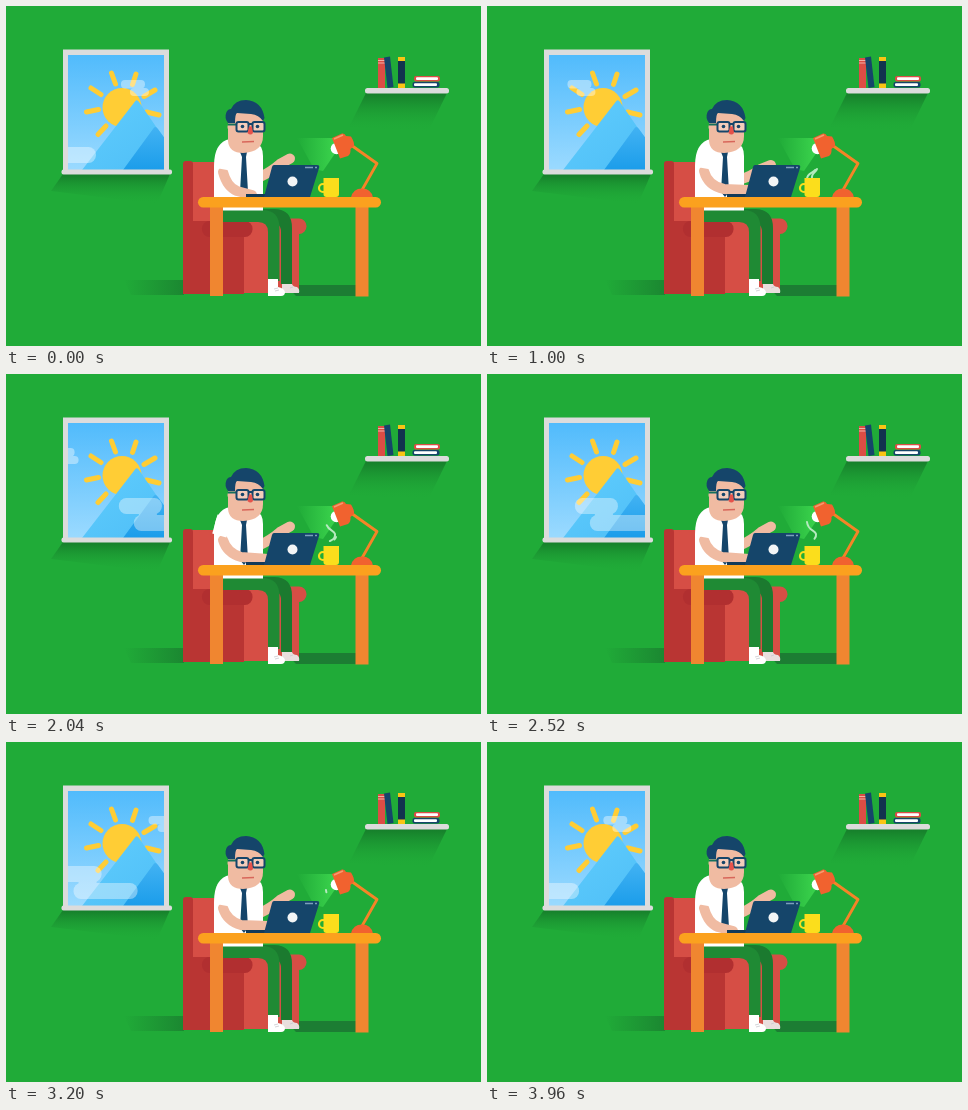
Recreate the animation shown at these times as an HTML page without scripts. Size 475 by 340 pixels, loop 4000 ms.

```html
<!DOCTYPE html>
<html lang="en">
<head>
<meta charset="utf-8">
<title>Desk work</title>
<style>
html, body { margin: 0; width: 100%; height: 100%; overflow: hidden; background: #20ab38; }
svg { display: block; width: 475px; height: 340px; }
.pale { fill: #dcdcdc; }
.navy { fill: #15456a; }
.skin { fill: #f0bba2; }
.limb { fill: none; stroke: #f0bba2; stroke-width: 10; stroke-linecap: round; stroke-linejoin: round; }
.deep { fill: #b93533; }
.red { fill: #d64e45; }
.rays { stroke: #ffcd35; stroke-width: 5; stroke-linecap: round; }
.steam { fill: none; stroke: #b5eabf; stroke-width: 2; stroke-linecap: round; }
</style>
</head>
<body>
<svg viewBox="0 0 475 340">
<defs>
  <linearGradient id="sky" x2="0" y2="1">
    <stop stop-color="#51bbfc"/><stop offset="1" stop-color="#9bdaff"/>
  </linearGradient>
  <linearGradient id="peak" x2="1" y2="1">
    <stop offset=".3" stop-color="#5ac8fb"/><stop offset="1" stop-color="#4dbdf6"/>
  </linearGradient>
  <linearGradient id="ridge" x2="0" y2="1">
    <stop stop-color="#42b2f3"/><stop offset="1" stop-color="#1b9dea"/>
  </linearGradient>
  <linearGradient id="drop" x2="0" y2="1">
    <stop stop-color="#147528" stop-opacity=".85"/><stop offset="1" stop-color="#20ab38" stop-opacity="0"/>
  </linearGradient>
  <linearGradient id="floor">
    <stop stop-color="#1b8731" stop-opacity="0"/><stop offset="1" stop-color="#1b8731"/>
  </linearGradient>
  <linearGradient id="glow">
    <stop stop-color="#3ed84f" stop-opacity="0"/><stop offset="1" stop-color="#3ed84f"/>
  </linearGradient>
  <clipPath id="pane"><rect x="62" y="49" width="96" height="115"/></clipPath>
  <g id="small">
    <rect x="115" y="74" width="24" height="8.5" rx="4"/>
    <rect x="124" y="82" width="19" height="8" rx="4"/>
  </g>
  <g id="large">
    <rect x="11" y="124" width="43" height="16" rx="7.5"/>
    <rect x="26" y="141" width="64" height="16" rx="7.5"/>
    <path d="M31 139H49V142H31Z"/>
  </g>
</defs>

<rect width="475" height="340" fill="#20ab38"/>

<!-- window -->
<path d="M57 168H164L151 198L45 185Z" fill="url(#drop)"/>
<rect class="pale" x="57" y="43.500" width="106" height="122"/>
<g clip-path="url(#pane)">
  <rect x="62" y="49" width="96" height="115" fill="url(#sky)"/>
  <circle cx="116" cy="101.500" r="19.500" fill="#ffcd35"/>
  <path class="rays" d="M105.500 67L109.500 78M130 68L126.500 78.500M149 84L138 90.500M153 109L140.500 106M85 82L95 88.500M80.500 106L92.500 103.500M92 128.500L100 120"/>
  <path d="M76 164L129 95.500Q131 93 133 96L180 164Z" fill="url(#peak)"/>
  <path d="M117 164L147 123Q149 119 152 123L182 164Z" fill="url(#ridge)"/>
  <g fill="#fff" opacity=".4">
    <use href="#small"/><use href="#small" x="138"/>
    <animateTransform attributeName="transform" type="translate" from="0" to="-138" dur="4s" repeatCount="indefinite"/>
  </g>
  <g fill="#fff" opacity=".38">
    <use href="#large"/><use href="#large" x="208"/>
    <animateTransform attributeName="transform" type="translate" from="0" to="-208" dur="4s" repeatCount="indefinite"/>
  </g>
</g>
<rect class="pale" x="55.500" y="163.500" width="110.500" height="5" rx="2"/>

<!-- shelf -->
<path d="M360 87H441L422 126L343 121Z" fill="url(#drop)"/>
<rect x="372" y="52" width="7" height="30" fill="#dc4d45"/>
<path d="M372 54.500H379M372 57H379" stroke="#f2b0a6"/>
<path class="navy" d="M378 51.500L384 50.500L387.500 81L381.500 82Z"/>
<rect x="392" y="51" width="7" height="31" fill="#12334f"/>
<path d="M392 51H399V55H392ZM392 77.500H399V82H392Z" fill="#f9c414"/>
<rect x="408" y="70" width="26" height="5.500" rx="2" fill="#dc4d45"/>
<rect x="410" y="71.300" width="22" height="2.800" rx="1" fill="#fff"/>
<rect class="navy" x="406.500" y="76" width="27" height="5.500" rx="2"/>
<rect x="408" y="77.300" width="23" height="2.800" rx="1" fill="#fff"/>
<rect class="pale" x="359" y="82" width="84" height="5.500" rx="2.500"/>

<!-- floor shadows -->
<path d="M118 274H178V289H125Z" fill="url(#floor)"/>
<path d="M280 279H350V290H290Z" fill="#1c7d33"/>

<!-- chair -->
<rect class="red" x="184" y="156" width="40" height="70" rx="3"/>
<rect class="red" x="238" y="213" width="55" height="74"/>
<rect class="red" x="276" y="212.500" width="24.500" height="15.500" rx="7.500"/>
<path class="deep" d="M177 158Q177 155 180 155H184Q187 155 187 158V215H238V288H177Z"/>
<rect x="196" y="215" width="50.500" height="16" rx="7.500" fill="#b12f30"/>

<!-- legs -->
<path d="M217 203H268Q286 203 286 222V278H275V226Q275 216 263 215H217Z" fill="#1b7a2f"/>
<path d="M217 204H256Q273.500 204 273.500 222V275H262V226Q262 216 252 216H217Z" fill="#1f8a34"/>
<path d="M276 278H286Q287 281 291 281Q294 283 293 287H276Z" fill="#e9dedd"/>
<path d="M262 273H272V281Q278 282 279 286Q279 290 275 290H262Z" fill="#fff"/>
<path d="M268 283l4-1M269 285l4-1M284 282l3-1" stroke="#c9c9cf" stroke-width=".8"/>

<!-- lamp light -->
<path d="M291 132H334L330 146L317 165L308 163Z" fill="url(#glow)"/>

<!-- body -->
<path class="limb" d="M252 172Q265 166 274 158L284 152.500">
  <animate attributeName="d" dur="4s" repeatCount="indefinite" keyTimes="0;.2;.24;.27;.31;1"
    values="M252 172Q265 166 274 158L284 152.500;M252 172Q265 166 274 158L284 152.500;M252 174Q265 170 274 163L284 159;M252 174Q265 170 274 163L284 159;M252 172Q265 166 274 158L284 152.500;M252 172Q265 166 274 158L284 152.500"/>
</path>
<path d="M224 133Q208 136 208 160V204.500H257V150Q257 138 247 136Z" fill="#fff"/>
<path class="navy" d="M234 146H241L240 151L242 186L238 191L234 186L236 151Z"/>

<!-- head -->
<path class="skin" d="M222 106V135Q223 147 237 147Q257 146 257 130V106Z"/>
<path class="navy" d="M222 117Q218 112 220.500 106Q222 103 225 103Q229 94 240 94Q256 95 258.500 112L257 115Q253 109 245 108L231 107Q229 108 229 117Z"/>
<circle class="skin" cx="225" cy="121" r="3.500"/>
<path d="M222 118.500H231" stroke="#14705c" stroke-width="2"/>
<g fill="#f4cdbb" stroke="#15456a" stroke-width="2">
  <rect x="230.500" y="116" width="12" height="9.500" rx="2"/>
  <rect x="246.500" y="116" width="12" height="9.500" rx="2"/>
  <path d="M242 118H247" fill="none"/>
</g>
<circle class="navy" cx="236.500" cy="120.500" r="1.800"/>
<circle class="navy" cx="251.500" cy="120.500" r="1.800"/>
<path d="M243 120.500H246L247 127Q244.500 130 241.500 127Z" fill="#e5524b"/>
<path d="M236 136L248 135.500" stroke="#d8665a" stroke-width="1.500"/>

<!-- near arm -->
<path class="limb" d="M217 166Q221 181 231 185L246 189">
  <animate attributeName="d" dur="4s" repeatCount="indefinite" keyTimes="0;.11;.25;.39;.63;.8;.99;1"
    values="M217 166Q221 181 231 185L246 189;M217 165Q221 180 237 183L262 184;M217 165Q221 180 237 183L262 184;M212 163Q215 178 232 181Q246 182 262 172;M217 166Q221 179 235 183L262 185;M217 166Q221 179 235 183L262 184;M217 166Q221 181 231 185L246 189;M217 166Q221 181 231 185L246 189"/>
</path>
<path d="M219 143L215.500 158" fill="none" stroke="#fff" stroke-width="14.500">
  <animate attributeName="d" dur="4s" repeatCount="indefinite" keyTimes="0;.25;.39;.63;1"
    values="M219 143L215.500 163;M219 143L215.500 162;M218 142L211 160;M219 143L215.500 163;M219 143L215.500 163"/>
</path>

<!-- laptop -->
<rect x="240" y="188" width="30" height="3.500" fill="#123a59"/>
<path class="navy" d="M268 159H311Q314 159 313 162L304 191H258L266 161Q266.500 159 268 159Z"/>
<path d="M299 161.500H307M309 161.500H311" stroke="#7c9fbd" stroke-width="1.500"/>
<circle cx="286.500" cy="175.500" r="5" fill="#f2f5f6"/>

<!-- steam -->
<g>
  <path class="steam" pathLength="100" d="M320 173C320 165 330 168 329 160C328 156 321 157 320 148" stroke-dasharray="0 200">
    <animate attributeName="stroke-dasharray" dur="4s" repeatCount="indefinite" keyTimes="0;.075;.11;.25;.39;.63;.82;1"
      values="0 200;0 200;20 200;40 200;70 200;64 200;0 200;0 200"/>
    <animate attributeName="stroke-dashoffset" dur="4s" repeatCount="indefinite" keyTimes="0;.25;.39;.63;.82;1"
      values="0;0;-10;-36;-100;-100"/>
  </path>
  <path class="steam" pathLength="100" d="M325 173C324 166 329 167 330 163" stroke-dasharray="0 200">
    <animate attributeName="stroke-dasharray" dur="4s" repeatCount="indefinite" keyTimes="0;.11;.25;.39;.6;1"
      values="0 200;0 200;100 200;60 200;0 200;0 200"/>
    <animate attributeName="stroke-dashoffset" dur="4s" repeatCount="indefinite" keyTimes="0;.25;.39;.6;1"
      values="0;0;-40;-100;-100"/>
    <animate attributeName="opacity" dur="4s" repeatCount="indefinite" calcMode="discrete" keyTimes="0;.15;.6" values="0;1;0"/>
  </path>
  <animate attributeName="opacity" dur="4s" repeatCount="indefinite" calcMode="discrete" keyTimes="0;.085;.825" values="0;1;0"/>
</g>

<!-- mug -->
<circle cx="317" cy="182" r="4" fill="none" stroke="#fbde1c" stroke-width="2.200"/>
<path d="M317.500 172H333V188Q333 191 330 191H320.500Q317.500 191 317.500 188Z" fill="#fbde1c"/>

<!-- lamp -->
<path d="M356 184L371 157.500L345 139" fill="none" stroke="#f58427" stroke-width="2.800" stroke-linejoin="round"/>
<path d="M345 191.500Q347 182.500 356 182.500T367 191.500Z" fill="#f1622f"/>
<circle cx="330.500" cy="142.500" r="5.800" fill="#fff"/>
<path d="M326 132L336 127.500Q339 127 340 130L345 130.500Q348.500 136 348 140L344.500 143Q345 148 342 150L334 152.500Z" fill="#f1622f"/>
<path d="M328 133L337 129" stroke="#f79a70" stroke-width="1.500"/>

<!-- desk -->
<path d="M204 200H217V290H204ZM349.500 200H362.500V290.500H349.500Z" fill="#f08630"/>
<rect x="192" y="191" width="183" height="10.500" rx="5.200" fill="#fba11e"/>
</svg>
</body>
</html>
```
